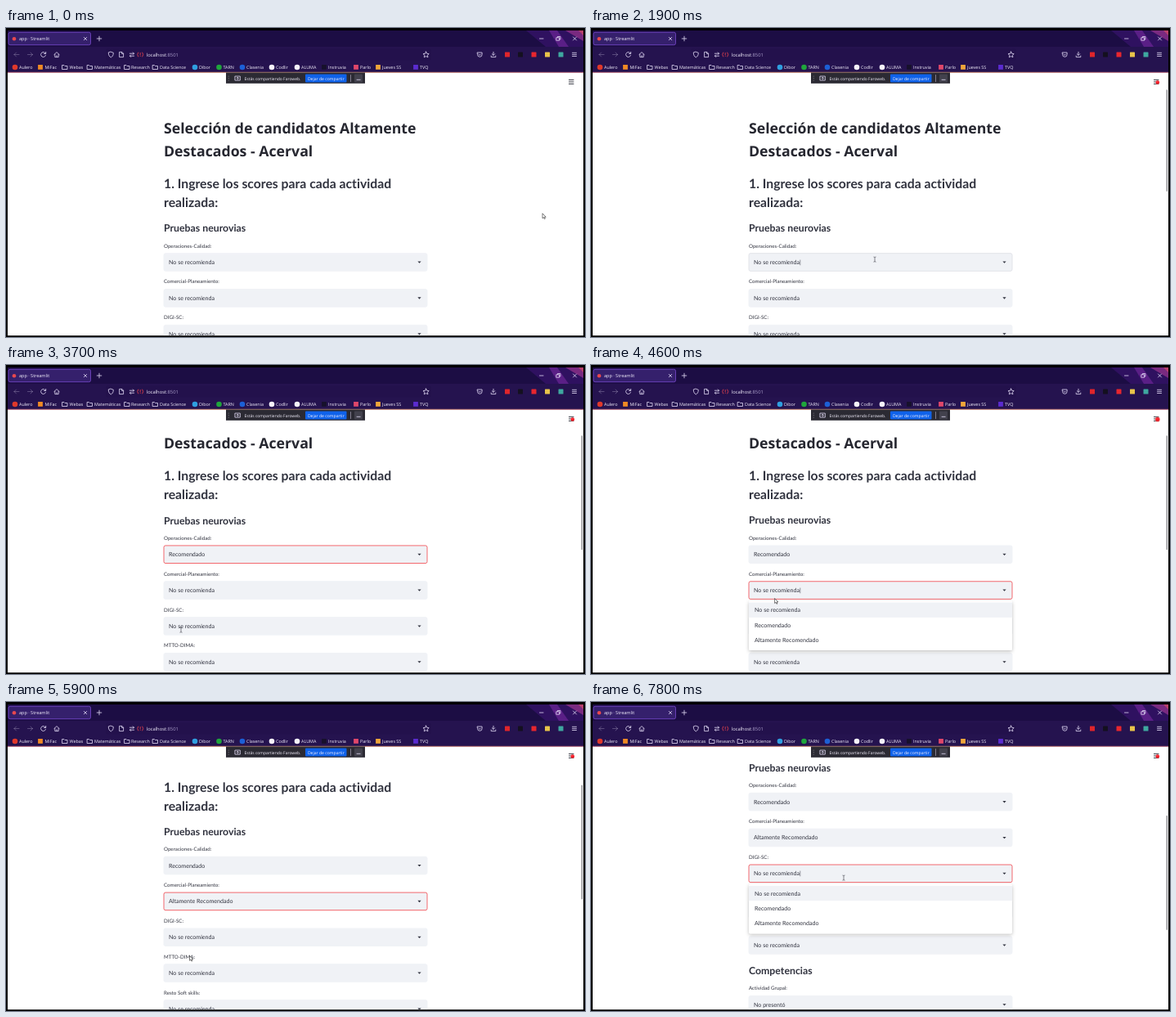
Animation, 708 px wide and 378 px high, one loop 8000 ms. Source, as an HTML page:

```html
<!DOCTYPE html>
<html lang="es">
<head>
<meta charset="utf-8">
<style>
html, body { margin: 0; width: 708px; height: 378px; overflow: hidden; background: #000; }
svg { display: block; }
text { text-rendering: geometricPrecision; white-space: pre; font-variant-ligatures: none; }
.ui { font-family: "Open Sans", "Noto Sans", sans-serif; fill: #f3effc; }
.page { font-family: Lato, "Open Sans", sans-serif; fill: #31333f; }
.title { font-family: "Noto Sans", "Open Sans", sans-serif; font-weight: 700; fill: #262730; }
.line { fill: none; stroke: #e4dcf7; stroke-width: .8; stroke-linecap: round; stroke-linejoin: round; }
</style>
</head>
<body>
<svg width="708" height="378" viewBox="0 0 708 378">
  <defs>
    <clipPath id="view"><rect x="2" y="75.5" width="704" height="300.7"/></clipPath>
    <clipPath id="window"><rect x="2" y="3" width="704" height="373.2"/></clipPath>
    <linearGradient id="edge"><stop stop-color="#a8566f"/><stop offset=".5" stop-color="#c98a62"/><stop offset="1" stop-color="#a8566f"/></linearGradient>
    <filter id="shadow" x="-5%" y="-10%" width="110%" height="130%"><feDropShadow dx="0" dy="1.5" stdDeviation="2" flood-opacity=".26"/></filter>
  </defs>
  <g clip-path="url(#window)">
    <rect x="2" y="54" width="704" height="324" fill="#fff"/>
    <g clip-path="url(#view)"><g id="content"></g></g>
    <g id="status"></g>
    <g id="chrome"></g>
    <g id="cursor"></g>
  </g>
</svg>
<script>
const LOOP = 8000, LEFT = 193, WIDTH = 322, STEP = 43.85;
const $ = id => document.getElementById(id);
const text = (x, y, size, str, cls = 'ui', extra = '') =>
  `<text x="${x}" y="${y}" font-size="${size}" class="${cls}" ${extra}>${str}</text>`;
const rect = (x, y, w, h, fill, extra = '') =>
  `<rect x="${x}" y="${y}" width="${w}" height="${h}" fill="${fill}" ${extra}/>`;
const dot = (x, y, r, fill, extra = '') => `<circle cx="${x}" cy="${y}" r="${r}" fill="${fill}" ${extra}/>`;
const line = (d, extra = '') => `<path class="line" d="${d}" ${extra}/>`;
const shape = (d, fill) => `<path d="${d}" fill="${fill}"/>`;

function drawChrome() {
  const folder = x => line(`M${x - 3} 45.5h2l1 1h3v4h-6z`);
  // label, icon x, text x, icon colour (none: folder), icon is square
  const bookmarks = [
    ['Aulero', 11, 16, '#e0392b'], ['MiFac', 42, 47.5, '#f08a24', 1], ['Webas', 72, 77.5],
    ['Matemáticas', 102.5, 108], ['Research', 148, 153], ['Data Science', 182.5, 188],
    ['Dibor', 231, 236, '#2f9fe0'], ['TARN', 260.5, 265.5, '#1fa53c'], ['Clasenia', 289, 294, '#1c5fd6'],
    ['Codlir', 325, 330, '#f5f2fa'], ['ALUMA', 356, 361, '#f5f2fa'], ['Instruvia', 389, 394, '#17112b', 1],
    ['Parlo', 428, 433, '#e0476a', 1], ['Jueves SS', 455, 460, '#f0a63a', 1], ['TVQ', 501, 506, '#5b2bd0', 1]
  ];
  const extensions = [[613, '#e0252b'], [629, '#14101f'], [645.5, '#e8262e'], [662, '#e8c44a'], [678.5, '#3fa8a0']];
  $('chrome').innerHTML =
    rect(2, 3, 704, 20, '#1c0d44') + rect(2, 23, 704, 31, '#25134f') +
    shape('M636 3L660 23H706V3z', '#2f1160') + shape('M664 3h10l14 20h-12z', '#5a1f86') +
    shape('M684 3h22v13z', '#7a2a80') + shape('M700 3h6v6z', '#b8406c') +
    rect(2, 53.8, 704, 1, 'url(#edge)') +
    rect(3, 5.3, 100.5, 15.4, '#35206c', 'rx="2" stroke="#7a4bd0" stroke-width=".8"') +
    dot(10, 13.2, 2.3, '#e8484e') + text(16, 15.4, 5.5, 'app · Streamlit') +
    line('M95.3 11.4l3.4 3.4m0-3.4l-3.4 3.4M111.2 13h5.6M114 10.2v5.6') +
    line('M652.5 13h4.5M673.2 11.8h3.4v3.4h-3.4zM674.4 11.6v-1.1h3.5v3.5h-1M693.5 11l4 4m0-4l-4 4') +
    rect(122, 25.7, 398, 13.6, '#23114c', 'rx="2"') +
    line('M16 32.5h-6m2.5-2.5l-2.5 2.5 2.5 2.5M26.5 32.5h6m-2.5-2.5l2.5 2.5-2.5 2.5', 'opacity=".35"') +
    line('M48.4 31.3a3 3 0 1 0 .1 2.2M48.7 29.4v2.1h-2.1') +
    line('M58.8 32.6l3.2-3 3.2 3M59.8 32.2v3.4h4.4v-3.4M62 35.4v-1.8') +
    line('M128.3 29.2l3 1.1c0 3-1 4.6-3 5.6-2-1-3-2.6-3-5.6z') +
    line('M139 29.4h2.8l1.8 1.8v4.4H139zM141.6 29.6v1.8h1.8') +
    line('M151.3 31.2h5.2m-1.3-1.3l1.3 1.3-1.3 1.3M156.6 34.2h-5.2m1.3-1.3l-1.3 1.3 1.3 1.3') +
    line('M164.2 30.5v2.5M164.2 34.4v.1M161.6 30a4 4 0 0 0 0 5M166.8 30a4 4 0 0 1 0 5', 'style="stroke:#f0444c"') +
    text(171.7, 34.8, 5.8, 'localhost<tspan fill="#a99cc8">:8501</tspan>') +
    line('M513.6 29l1.1 2.3 2.5.3-1.8 1.7.5 2.5-2.3-1.2-2.3 1.2.5-2.5-1.8-1.7 2.5-.3z') +
    line('M576.5 30h5.6v2.5a2.8 2.8 0 0 1-5.6 0zM577.9 32l1.4 1.4 1.4-1.4') +
    line('M596 29.3v4m-1.7-1.6l1.7 1.7 1.7-1.7M593.2 34v1.6h5.6V34') +
    extensions.map(([x, c]) => rect(x - 3, 29.5, 6, 6, c, 'rx=".6"')).join('') +
    line('M692.5 30.3h5M692.5 32.4h5M692.5 34.5h5') +
    bookmarks.map(([label, x, tx, color, square]) =>
      (!color ? folder(x) : square ? rect(x - 2.9, 45, 5.8, 5.8, color) : dot(x, 48, 3.3, color)) +
      text(tx, 50, 5.4, label)).join('') +
    rect(269, 54.5, 170, 13.3, '#2b2a33') +
    [59, 61.5, 64].map(y => dot(272.2, y, .5, '#8d8c96')).join('') +
    line('M280.3 59h6v5h-6zM283.3 63v-2.6m-1.2 1l1.2-1.2 1.2 1.2') +
    text(291.5, 63.5, 5, 'Estás compartiendo Faroweb.') +
    rect(366, 56.5, 50.5, 10, '#0f62ea', 'rx="1"') +
    text(391.3, 63.5, 5.1, 'Dejar de compartir', 'ui', 'text-anchor="middle"') +
    line('M421.5 57.5v8', 'opacity=".6"') +
    rect(426, 56.5, 10, 10, '#42414d', 'rx="1"') + line('M429 63.3h4.2');
}

const options = ['No se recomienda', 'Recomendado', 'Altamente Recomendado'];
// Each use of a select box: which row, when it opens and closes, what is picked
const picks = [
  { row: 0, open: 2000, close: 2720, value: 1 },
  { row: 1, open: 4350, close: 5320, value: 2 },
  { row: 2, open: 7400, close: 9999, value: 0 }
];
const rows = ['Operaciones-Calidad:', 'Comercial-Planeamiento:', 'DIGI-SC:', 'MTTO-DIMA:', 'Resto Soft skills:'];
const rowY = i => 286.5 + i * STEP;

const path = [
  [0, 657, 230], [300, 657, 230], [1000, 520, 262], [1700, 347, 283], [2050, 347, 283], [2600, 214, 329],
  [3100, 212, 329], [3700, 214, 324], [4200, 226, 277], [4400, 226, 277], [5100, 224, 336], [5320, 224, 336],
  [5700, 223, 319], [6100, 228, 308], [6500, 267, 247], [6800, 285, 278], [7200, 309, 215], [8000, 309, 215]
];
const clamp = v => Math.min(1, Math.max(0, v));
const easeOut = v => 1 - (1 - clamp(v)) ** 3;
const easeBoth = v => v * v * (3 - 2 * v);

function mouseAt(t) {
  const i = path.findIndex(p => p[0] > t), [a, b] = [path[i - 1], path[i]];
  const k = easeBoth((t - a[0]) / (b[0] - a[0]));
  return [a[1] + (b[1] - a[1]) * k, a[2] + (b[2] - a[2]) * k];
}

const scrollAt = t => 54.8 * (easeOut((t - 3430) / 290) +
  easeOut((t - 5830) / 280) + easeOut((t - 6020) / 300));

function select(y, value, border, caret) {
  return rect(LEFT, y - 10.8, WIDTH, 21.6, '#f0f2f6', `rx="2" stroke="${border}" stroke-width=".9"`) +
    text(199, y + 2.5, 7.1, value + (caret ? '|' : ''), 'page') +
    shape(`M503.4 ${y - 1}h4.2l-2.1 2.3z`, '#31333f');
}

function menu(y, hover) {
  return `<g filter="url(#shadow)">${rect(LEFT, y + 13, WIDTH, 60.5, '#fff', 'rx="2"')}</g>` +
    rect(LEFT, y + 15 + hover * 18.3, WIDTH, 18.3, '#f0f2f6') +
    options.map((o, i) => text(200, y + 26.8 + i * 18.3, 7.1, o, 'page')).join('');
}

function drawContent(t, scroll, mouseY, current, isOpen) {
  const heading = (y, size, str) => text(LEFT, y, size, str, 'page', 'font-weight="700"');
  let out = text(LEFT, 129, 17.7, 'Selección de candidatos Altamente', 'title') +
    text(LEFT, 157.2, 17.7, 'Destacados - Acerval', 'title') +
    heading(196.2, 15.75, '1. Ingrese los scores para cada actividad') + heading(219.2, 15.75, 'realizada:') +
    heading(249.3, 12.3, 'Pruebas neurovias');
  rows.forEach((label, i) => {
    const pick = picks.find(p => p.row === i);
    const value = options[pick && t >= pick.close ? pick.value : 0];
    const focused = current && current.row === i;
    const since = focused && t - (t >= current.close ? current.close : current.open - 100);
    const border = !focused ? '#f0f2f6' : t < current.open ? '#dfe1e7' : '#f2595e';
    out += text(LEFT, rowY(i) - 17.9, 6.2, label, 'page') +
      select(rowY(i), value, border, focused && since % 1060 < 530);
  });
  out += heading(497, 12.3, 'Competencias') + text(LEFT, 516.8, 6.2, 'Actividad Grupal:', 'page') +
    select(534.7, 'No presentó', '#f0f2f6');
  if (isOpen) {
    const y = rowY(current.row), hover = Math.floor((mouseY + scroll - y - 15) / 18.3);
    out += menu(y, Math.min(2, Math.max(0, hover)));
  }
  $('content').innerHTML = `<g transform="translate(0 ${-scroll})">${out}</g>` +
    (t >= 300 ? rect(703.6, 60 + scroll * .48, 1.4, 140, '#8b8b8f', 'rx=".7"') : '');
}

function drawStatus(t) {
  let out = `<path d="M688 63.4h6.4M688 65.9h6.4M688 68.4h6.4" stroke="#31333f" stroke-width=".95"/>`;
  if (t >= 300) {
    const k = clamp((t - 300) % 2000 / 1400);
    out += dot(692.8, 66.5, 2.2 + 4.2 * k, '#ff2b2b', `opacity="${.7 * (1 - k)}"`) + dot(692.8, 66.5, 2.3, '#f5202a');
  }
  const busy = .3 * clamp((t - 2750) / 150) * clamp((3300 - t) / 300);
  if (busy) out += `<g opacity="${busy}">${dot(615, 66, 1.8, '#808495')}${text(622, 68, 5.2, 'RUNNING...', 'page')}${text(664, 68, 5.2, 'Stop', 'page')}</g>`;
  $('status').innerHTML = out;
}

function drawCursor(x, y, scroll, current, isOpen) {
  const overBox = x > LEFT && x < LEFT + WIDTH && rows.some((_, i) => Math.abs(y + scroll - rowY(i)) < 11);
  const onMenu = isOpen && Math.abs(y + scroll - rowY(current.row) - 43) < 31;
  $('cursor').innerHTML = `<g transform="translate(${x} ${y})">` + (overBox && !onMenu
    ? '<path d="M-1.5-3Q0-3 0-2.2Q0-3 1.5-3M0-2.2V2.4M-1.5 3.2Q0 3.2 0 2.4Q0 3.2 1.5 3.2" fill="none" stroke="#44464e" stroke-width=".65"/>'
    : '<path d="M-1-3.2V2.8L.4 1.6 1.4 3.6 2.3 3.2 1.4 1.2H3.2z" fill="#fff" stroke="#222" stroke-width=".6"/>') + '</g>';
}

let start;
function frame(now) {
  start ??= now;
  const t = (now - start) % LOOP, scroll = scrollAt(t), [x, y] = mouseAt(t);
  const current = picks.filter(p => t >= p.open - 150).pop();
  const isOpen = current && t >= current.open && t < current.close;
  drawContent(t, scroll, y, current, isOpen);
  drawStatus(t);
  drawCursor(x, y, scroll, current, isOpen);
  requestAnimationFrame(frame);
}
drawChrome();
requestAnimationFrame(frame);
</script>
</body>
</html>
```
